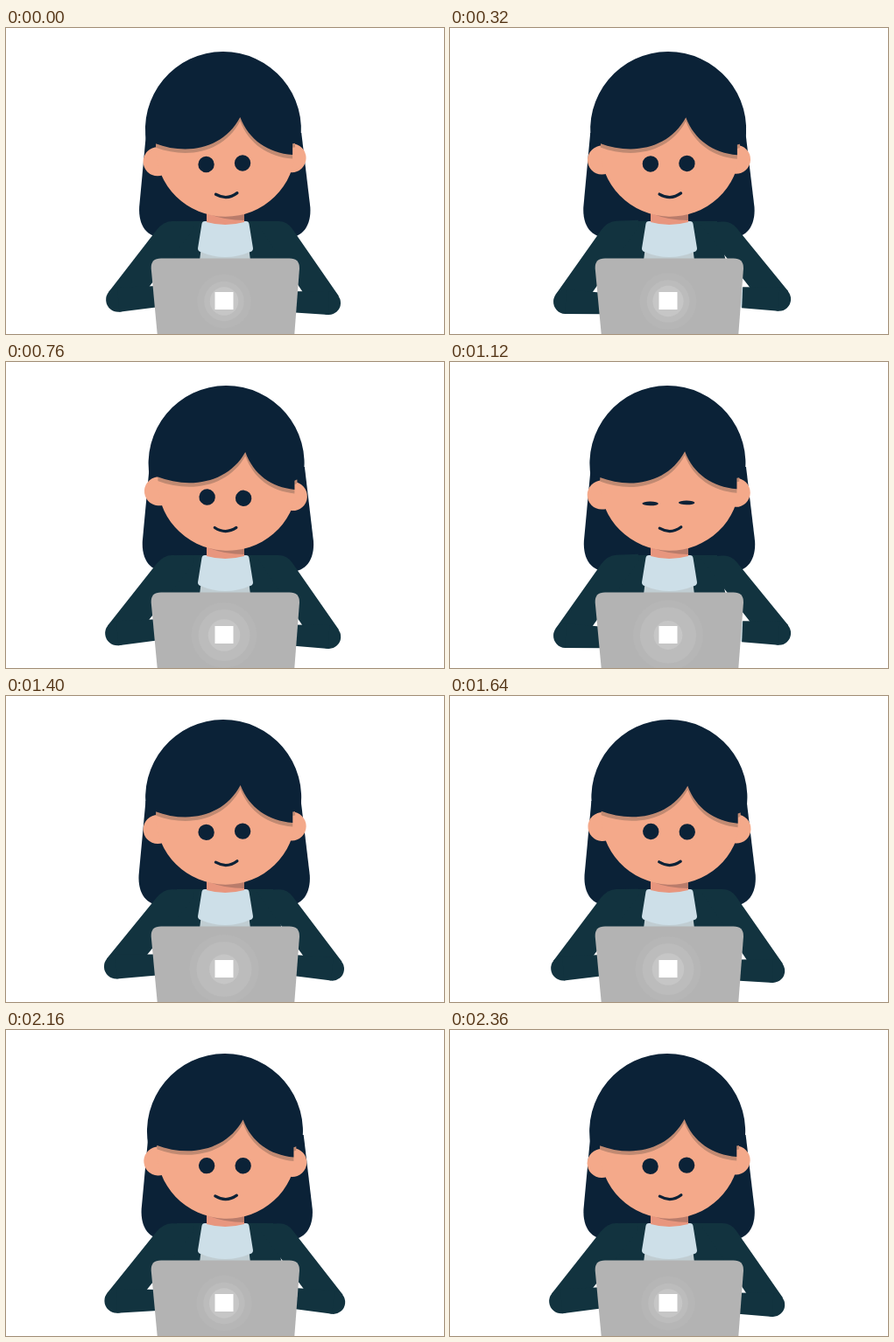
An HTML page for the animation above (2400 ms loop, 500x350 px).

```html
<!DOCTYPE html>
<html lang="en">
<head>
<meta charset="utf-8">
<title>Working at a laptop</title>
<style>
  html, body { margin: 0; width: 100%; height: 100%; overflow: hidden; background: #fff; }
  svg { display: block; width: 100vw; height: 100vh; }
  .hair { fill: #0b2237; }
  .skin { fill: #f4a98a; }
  .suit { fill: #12333f; }
  .shirt { fill: #cddfe8; }
</style>
</head>
<body>
<svg viewBox="0 0 500 350">
  <defs>
    <clipPath id="faceClip"><ellipse id="faceMask" cx="250.5" cy="138" rx="79.5" ry="77.7"/></clipPath>
    <path id="bangs"/>
  </defs>

  <path id="backHair" class="hair" d="M159.400 120 L151.500 205 C150.500 226 160 240 180 240 H320 C338 240 348 226 346.700 205 L336.600 120 Z"/>

  <path class="suit" d="M195 221 H305 L322 300 H178 Z"/>
  <g id="leftArm" class="suit">
    <path d="M215 221 H190 Q180 221 172 231 L117.300 302.500 L128.500 311 L153 310 L215 229 Z"/>
  </g>
  <g id="rightArm" class="suit">
    <path d="M285 221 H311 Q321 221 327 230 L379.800 306.500 L368.500 314.500 L346 313 Z"/>
  </g>
  <g id="leftFore" class="suit">
    <circle r="14"/><path d="M0 -14 L46 -12 V12 L0 14 Z"/>
  </g>
  <g id="rightFore" class="suit">
    <path class="shirt" d="M-42 -11.500 H-46 V11.500 H-42 Z"/>
    <circle r="13.5"/><path d="M0 -13.500 L-42 -12 V12 L0 13.500 Z"/>
  </g>

  <path fill="#c0cdd2" d="M223 250 H277 L279 266 H221 Z"/>
  <path class="shirt" d="M227 221 H274 Q277 221 277.500 224 L282 252 Q282 255 279 256 Q250 268 222 256 Q219 255 219 252 L223.500 224 Q224 221 227 221 Z"/>
  <path fill="#e8967e" d="M229 205 H272 V222 Q250 228 229 222 Z"/>
  <path fill="#b97c6b" d="M232 213 L272 208 V220 Q250 220 232 213 Z"/>

  <g id="head">
    <circle class="skin" cx="173" cy="153" r="16.500"/>
    <circle class="skin" cx="326" cy="148.500" r="16.500"/>
    <ellipse class="skin" cx="250.500" cy="138" rx="79.500" ry="77.700"/>
    <ellipse id="leftEye" class="hair" cx="228.500" rx="9.200"/>
    <ellipse id="rightEye" class="hair" cx="270" rx="9.200"/>
    <path d="M239.500 190.300 Q252.500 197.500 264 188.600" fill="none" stroke="#0b2237" stroke-width="3.200" stroke-linecap="round"/>
  </g>
  <g clip-path="url(#faceClip)"><use href="#bangs" y="4.500" fill="#c18a72"/></g>
  <use href="#bangs" class="hair"/>

  <path fill="#b3b3b3" d="M177 263.600 H323.500 Q335.300 263.600 335 275 L329.300 350 H172.700 L165.700 275 Q165.200 263.600 177 263.600 Z"/>
  <circle id="haze" cx="249" cy="312.500" fill="#b6b6b6"/>
  <circle id="halo" cx="249" cy="312.500" fill="#bcbcbc"/>
  <circle id="glow" cx="249" cy="312.500" fill="#c6c6c6"/>
  <rect x="238.500" y="302" width="21" height="20" fill="#fff"/>
</svg>
<script>
  const LOOP = 2400, STEP = 40, EYE_R = 9.2;
  const $ = id => document.getElementById(id);
  const set = (id, name, value) => $(id).setAttribute(name, value);
  const wave = (t, period, peak = 0) => Math.cos(2 * Math.PI * (t - peak) / period);
  const sway = (t, delay) => (1 - wave(t, 1200, delay)) / 2;

  // Swings the upper arm from the shoulder and hangs the forearm on the elbow.
  function poseArm(side, shoulder, elbow, turn, foreAngle) {
    const [sx, sy] = shoulder;
    const dx = elbow[0] - sx, dy = elbow[1] - sy;
    const c = Math.cos(turn), s = Math.sin(turn);
    const x = sx + dx * c - dy * s, y = sy + dx * s + dy * c;
    set(side + 'Arm', 'transform', `rotate(${turn * 180 / Math.PI} ${sx} ${sy})`);
    set(side + 'Fore', 'transform', `translate(${x} ${y}) rotate(${foreAngle})`);
  }

  function poseEye(id, y, open) {
    set(id, 'ry', EYE_R * open);
    set(id, 'cy', y + (EYE_R - 0.8) * (1 - open));
  }

  // The crown slides sideways while the parting leads and the ends follow the ears.
  function bangsPath(s) {
    const cx = 247.8 + 4 * s;
    return `M${cx - 87.6} 132 A89 89 0 1 1 ${cx + 87.7} 131
      L${327 + 2.5 * s} ${132 + 4 * s} V${145 + s}
      C${299 + 4 * s} 143 ${277 + 6 * s} ${128 + s} ${267 + 6.5 * s} ${102 + s}
      C${248 + 6 * s} 138 ${207 + 4 * s} 146 ${170 + 2 * s} ${132 - s} Z`;
  }

  function draw(t) {
    const lean = sway(t, 80);
    const tilt = `rotate(${4 * lean} 251 172)`;
    set('head', 'transform', tilt);
    set('faceMask', 'transform', tilt);
    set('bangs', 'd', bangsPath(lean));
    set('backHair', 'transform', `translate(${4.3 * sway(t, 150)} 0)`);

    const leftShift = 0.7 - 3.5 * wave(t, 800, 640);
    const rightShift = 4 - 4 * wave(t, 800);
    poseArm('left', [182, 222], [128.5, 311], -leftShift / 90, -1 - 4 * wave(t, 800, 760));
    poseArm('right', [317, 222], [368.5, 314.5], -rightShift / 92, 3 + 2.7 * wave(t, 800, 540));

    const shut = Math.max(0, 1 - Math.abs(t - 1120) / 120);
    const open = 1 - 0.74 * shut;
    poseEye('leftEye', 156, open);
    poseEye('rightEye', 154.5, open);

    const halo = 27.5 - 4.7 * wave(t, LOOP);
    set('haze', 'r', halo + 8);
    set('halo', 'r', halo);
    set('glow', 'r', 17.5 - 1.2 * wave(t, LOOP / 2));
  }

  const start = performance.now();
  function tick() {
    const t = (performance.now() - start) % LOOP;
    draw(Math.floor(t / STEP) * STEP);
    requestAnimationFrame(tick);
  }
  draw(0);
  requestAnimationFrame(tick);
</script>
</body>
</html>
```
